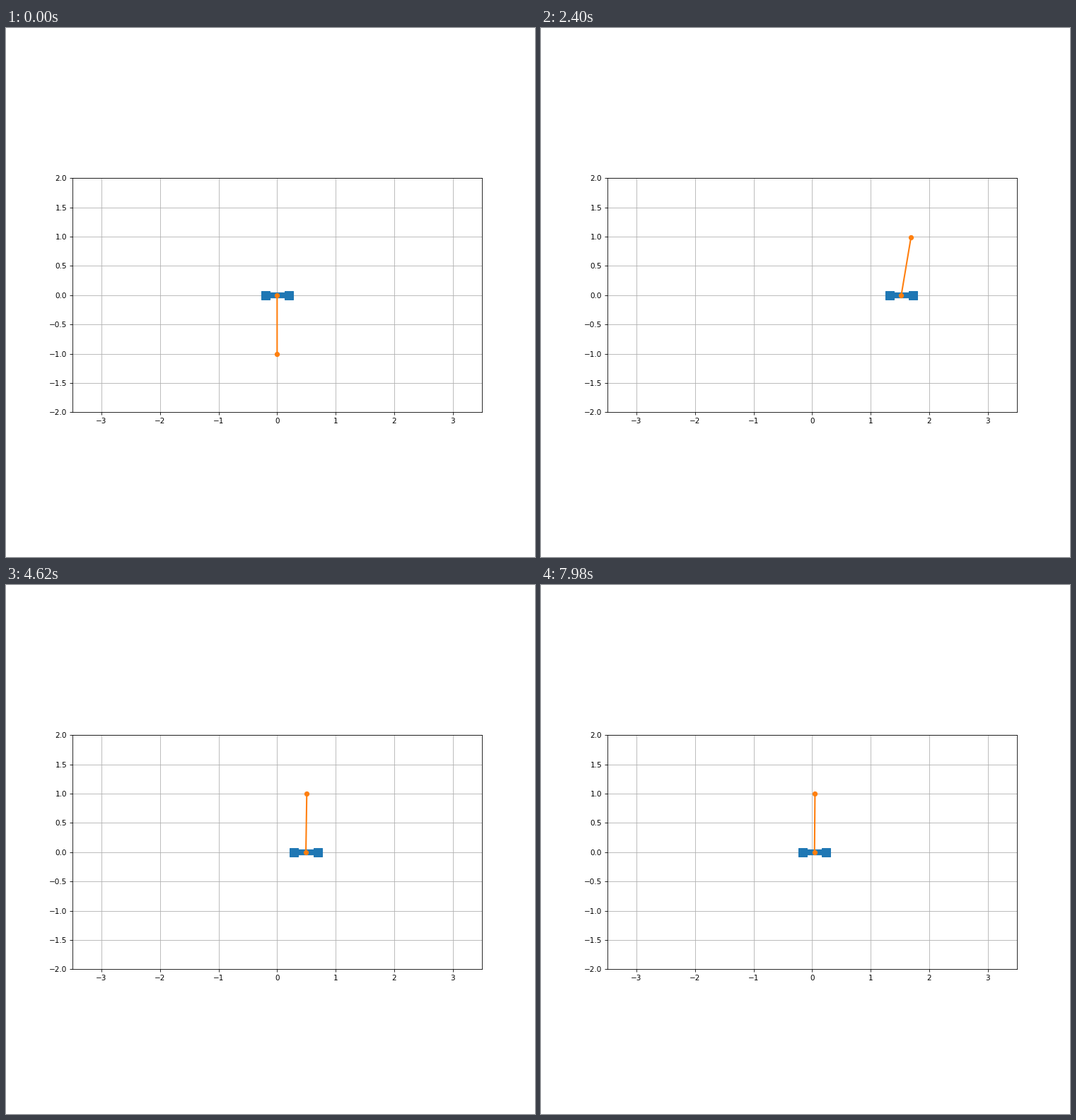
These frames come from a looping animation (748 by 748 pixels, 8000 ms). A matplotlib script:

```python
import numpy as np
import matplotlib.pyplot as plt
from matplotlib.animation import FuncAnimation

LOOP_MS = 8000
TICK_MS = 20
HOLD = 3            # ticks per picture
HALF_CART = 0.2
ROD = 1.0
CATCH = 1.8         # from here the controller balances the rod

# swing-up waypoints: time (s), value, speed
CART = [(0, 0, 0), (0.84, 1.945, 1.9), (1.56, 2.14, -0.8), (CATCH, 1.943, -0.8)]
SWING = [(0, 0, 0), (0.84, -1.585, 0.2), (1.32, -0.13, 5.6), (CATCH, 2.131, 2.9)]


def glide(points, t):
    """Cubic Hermite path through the waypoints."""
    for (t0, p0, v0), (t1, p1, v1) in zip(points, points[1:]):
        if t <= t1:
            break
    h = t1 - t0
    s = (t - t0) / h
    ease = s * s * (3 - 2 * s)
    return (p0 + (p1 - p0) * ease
            + h * s * (1 - s) * (v0 * (1 - s) - v1 * s))


def pose(t):
    """Cart position and rod angle, measured from straight down."""
    if t < CATCH:
        return glide(CART, t), glide(SWING, t)
    dt = t - CATCH
    x = (1.03 + 2.17 * dt) * np.exp(-0.95 * dt) + 0.913 * np.exp(-2.5 * dt)
    lean = 0.987 * np.exp(-3.2 * dt) + 0.024 * np.exp(-0.17 * dt)
    return x, np.pi - lean


fig, ax = plt.subplots(figsize=(10, 10), dpi=74.8)
ax.set_aspect("equal")
ax.set_xlim(-3.5, 3.5)
ax.set_ylim(-2, 2)
ax.set_xticks(range(-3, 4))
ax.set_yticks(np.arange(-2, 2.1, 0.5))
ax.grid()

cart, = ax.plot([], [], "s-", color="C0", lw=8, ms=12)
rod, = ax.plot([], [], "o-", color="C1", lw=2, ms=6, snap=False)


def update(tick):
    t = tick // HOLD * HOLD * TICK_MS / 1000
    x, a = pose(t)
    cart.set_data([x - HALF_CART, x + HALF_CART], [0, 0])
    rod.set_data([x, x + ROD * np.sin(a)], [0, -ROD * np.cos(a)])
    return cart, rod


anim = FuncAnimation(fig, update, frames=LOOP_MS // TICK_MS,
                     interval=TICK_MS, repeat=True, repeat_delay=0, blit=True)
plt.show()
```
